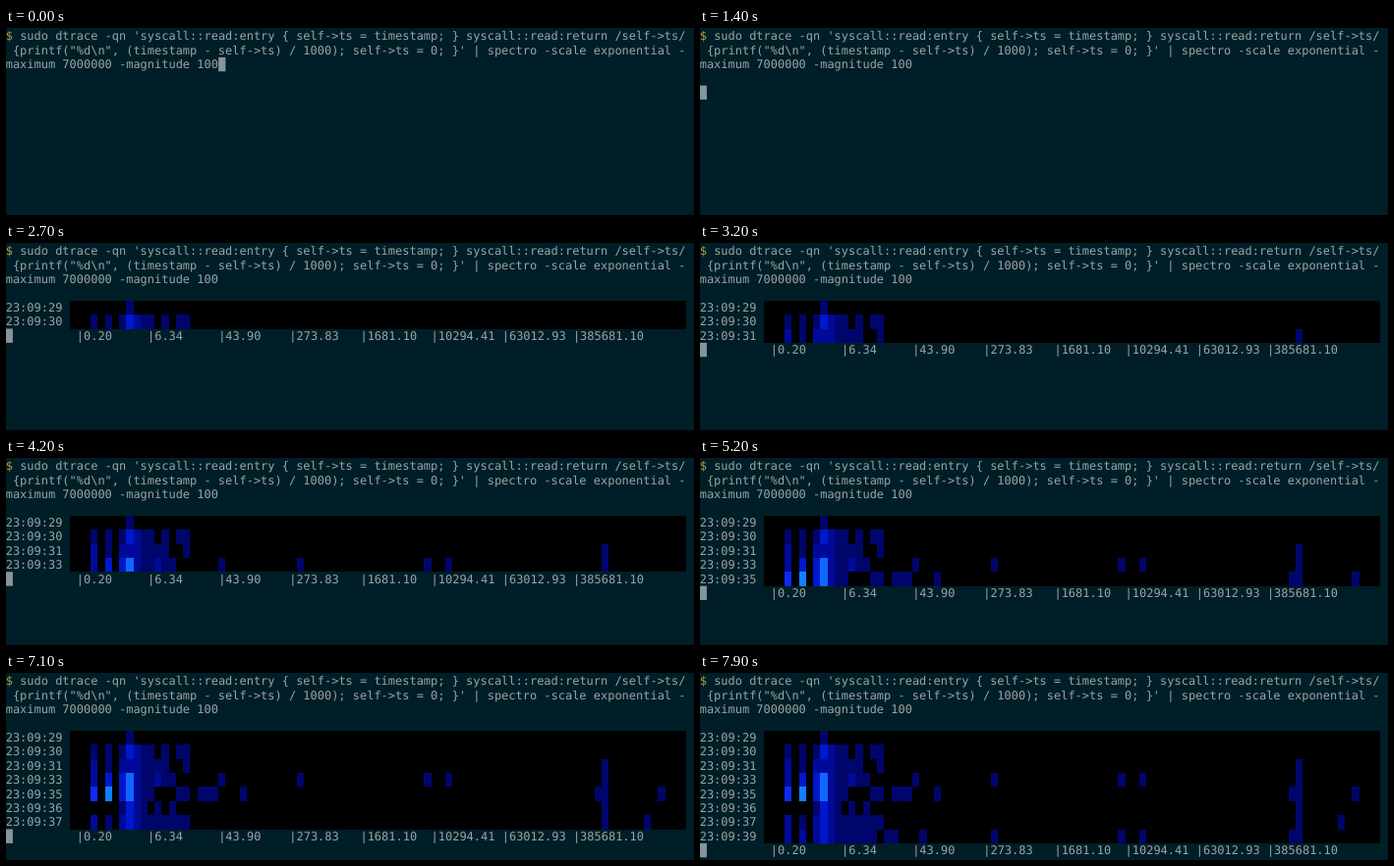
An HTML page that plays this animation: 700x191 px, repeating every 8 s.

```html
<!DOCTYPE html>
<html lang="en">
<head>
<meta charset="utf-8">
<title>Read latency spectrogram</title>
<style>
  html, body { margin: 0; width: 100%; height: 100%; overflow: hidden; background: #001e27; }
  svg { display: block; }
  text {
    font: 11.985px "DejaVu Sans Mono", monospace;
    fill: #98a5a5;
    white-space: pre;
    text-rendering: geometricPrecision;
  }
  .prompt { fill: #b3a03c; }
  .cursor { fill: #87969a; }
</style>
</head>
<body>
<svg id="term" width="700" height="191" viewBox="0 0 700 191"></svg>
<script>
const LOOP = 8000, ENTER = 1400;
const CW = 7.215, LH = 14.4, LEFT = -0.3, TOP = 1.1, BASE = 11.3;
const FIRST = 4, LABEL = 9, COLS = 87;
const SHADES = ['#000', '#00056c', '#000a9a', '#0018cc', '#0c2cf5', '#1068ff', '#1180ff'];

const command = [
  "$ sudo dtrace -qn 'syscall::read:entry { self->ts = timestamp; } syscall::read:return /self->ts/",
  ' {printf("%d\\n", (timestamp - self->ts) / 1000); self->ts = 0; }\' | spectro -scale exponential -',
  'maximum 7000000 -magnitude 100'
];
const ticks = ['0.20', '6.34', '43.90', '273.83', '1681.10', '10294.41', '63012.93', '385681.10'];

// [shown at ms, clock second, shade per column from the left, sparse columns further right]
const samples = [
  [2000, 29, '........1', []],
  [2500, 30, '...1.1.13211.1.11', []],
  [3100, 31, '...2.1.2221111..1', [75]],
  [4000, 33, '...2.3.35211211......1', [32, 50, 53, 75]],
  [5000, 35, '...4.6.35211...11.111...1', [74, 75, 83]],
  [5600, 36, '.......1321.1.1', [75]],
  [6200, 37, '...2.1.2321111111', [75, 81]],
  [7300, 39, '...2.2.232111111.11...1', [32, 50, 53, 74, 75]]
];

const term = document.getElementById('term');
const xOf = col => LEFT + col * CW;
const yOf = row => TOP + row * LH;

function add(parent, tag, attrs = {}, content = '') {
  const el = document.createElementNS('http://www.w3.org/2000/svg', tag);
  for (const key in attrs) el.setAttribute(key, attrs[key]);
  el.textContent = content;
  return parent.appendChild(el);
}

const write = (parent, row, col, str, attrs) =>
  add(parent, 'text', { x: xOf(col), y: yOf(row) + BASE, ...attrs }, str);

const block = (parent, row, col, width, attrs) =>
  add(parent, 'rect', { x: xOf(col), y: yOf(row), width: width * CW, height: LH, ...attrs });

write(term, 0, 0, '$', { class: 'prompt' });
write(term, 0, 2, command[0].slice(2));
write(term, 1, 1, command[1].trim());
write(term, 2, 0, command[2]);

const rows = samples.map(([, second, shades, far], i) => {
  const g = add(term, 'g');
  const row = FIRST + i;
  const cell = (col, level) =>
    block(g, row, LABEL + col, 1, { fill: SHADES[level], 'shape-rendering': 'crispEdges' });
  write(g, row, 0, '23:09:' + second);
  block(g, row, LABEL, COLS, { fill: SHADES[0], 'shape-rendering': 'crispEdges' });
  [...shades].forEach((s, col) => s !== '.' && cell(col, +s));
  far.forEach(col => cell(col, 1));
  return g;
});

const axis = add(term, 'g');
ticks.forEach((label, i) => write(axis, 0, 10 * (i + 1), '|' + label));
const cursor = block(term, 0, 0, 1, { class: 'cursor' });

function render(t) {
  const shown = samples.filter(s => t >= s[0]).length;
  const row = t < ENTER ? 2 : FIRST + shown;
  const col = t < ENTER ? command[2].length : 0;
  rows.forEach((g, i) => g.setAttribute('visibility', i < shown ? 'visible' : 'hidden'));
  axis.setAttribute('visibility', shown ? 'visible' : 'hidden');
  axis.setAttribute('transform', `translate(0 ${row * LH})`);
  cursor.setAttribute('transform', `translate(${col * CW} ${row * LH})`);
}

const start = performance.now();
function tick() {
  render((performance.now() - start) % LOOP);
  requestAnimationFrame(tick);
}
tick();
</script>
</body>
</html>
```
